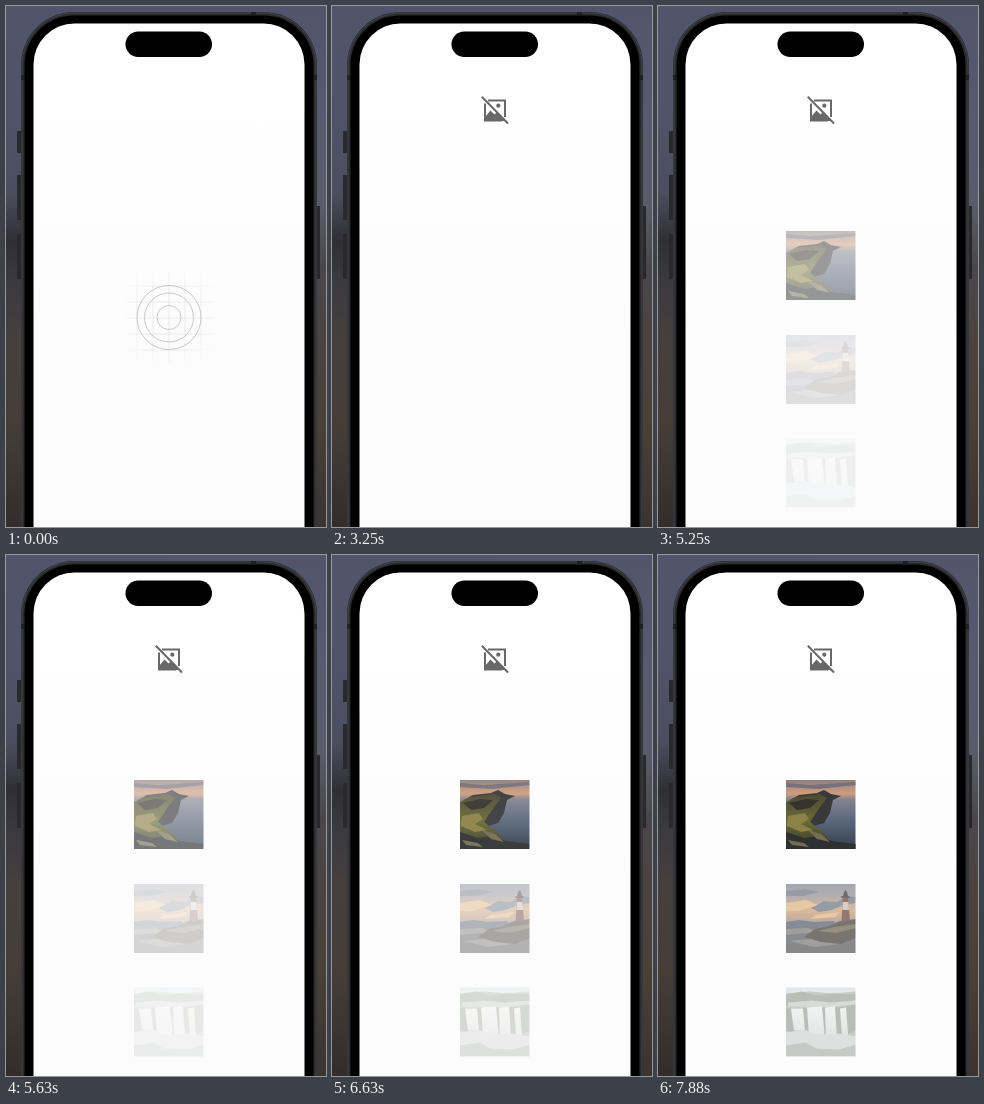
Animation, 320 px wide and 521 px high, one loop 8 s. Source, as an HTML page:

```html
<!DOCTYPE html>
<html lang="en">
<head>
<meta charset="utf-8">
<title>Image fade</title>
<style>
html, body { margin: 0; width: 100%; height: 100%; overflow: hidden; background: #3c3836; }
svg { display: block; width: 100vw; height: 100vh; }
</style>
</head>
<body>
<svg viewBox="0 0 320 521">
  <defs>
    <linearGradient id="wallL" x2="0" y2="1">
      <stop stop-color="#50556b"/><stop offset=".2" stop-color="#50546a"/>
      <stop offset=".36" stop-color="#4b4e5e"/><stop offset=".45" stop-color="#302f36"/>
      <stop offset=".53" stop-color="#3b3a40"/><stop offset=".64" stop-color="#463f3d"/>
      <stop offset=".8" stop-color="#463d37"/><stop offset="1" stop-color="#322d2b"/>
    </linearGradient>
    <linearGradient id="wallR" x2="0" y2="1">
      <stop stop-color="#50556b"/><stop offset=".2" stop-color="#555a70"/>
      <stop offset=".38" stop-color="#5a5c6b"/><stop offset=".5" stop-color="#4a474c"/>
      <stop offset=".62" stop-color="#4b4341"/><stop offset=".8" stop-color="#4a4038"/>
      <stop offset="1" stop-color="#3b3330"/>
    </linearGradient>
    <linearGradient id="paper" x2="0" y2="1">
      <stop stop-color="#fff"/><stop offset=".28" stop-color="#fefefe"/>
      <stop offset=".5" stop-color="#fcfcfd"/><stop offset="1" stop-color="#fcfcfd"/>
    </linearGradient>
    <radialGradient id="line" gradientUnits="userSpaceOnUse" cx="163" cy="311.500" r="49">
      <stop stop-color="#e4e4e4"/><stop offset=".7" stop-color="#e9e9e9"/>
      <stop offset="1" stop-color="#f8f8f8"/>
    </radialGradient>
    <linearGradient id="sky1" x2="0" y2="1">
      <stop stop-color="#8b7f7f"/><stop offset=".1" stop-color="#b3907f"/>
      <stop offset=".2" stop-color="#cf9d7e"/><stop offset=".28" stop-color="#85838f"/>
      <stop offset=".6" stop-color="#58677a"/><stop offset="1" stop-color="#343f4d"/>
    </linearGradient>
    <linearGradient id="grass" x2="0" y2="1">
      <stop stop-color="#4c4934"/><stop offset=".5" stop-color="#696937"/>
      <stop offset="1" stop-color="#36372a"/>
    </linearGradient>
    <linearGradient id="sky2" x2="0" y2="1">
      <stop stop-color="#838b98"/><stop offset=".18" stop-color="#9b9494"/>
      <stop offset=".38" stop-color="#d2a377"/><stop offset=".54" stop-color="#a7917f"/>
      <stop offset=".58" stop-color="#5e6672"/><stop offset="1" stop-color="#62605e"/>
    </linearGradient>
    <linearGradient id="fall" x2="0" y2="1">
      <stop stop-color="#e3e4e2"/><stop offset="1" stop-color="#c4c8c5"/>
    </linearGradient>
    <clipPath id="tile"><path d="M0 0h69.500v69H0z"/></clipPath>
  </defs>

  <!-- backdrop and phone -->
  <path fill="url(#wallL)" d="M0 0h160v521H0z"/>
  <path fill="url(#wallR)" d="M160 0h160v521H160z"/>
  <path fill="#29292b" d="M11 125h5v22h-5zM11 169h5v45h-5zM11 228h5v45h-5zM310 200h4v73h-4z"/>
  <rect x="15" y="6" width="296" height="620" rx="53" fill="#2b2b2e"/>
  <rect x="16" y="7" width="294" height="620" rx="52" fill="none" stroke="#434448"/>
  <path fill="#202022" d="M15 69h4v5h-4zM307 69h4v5h-4zM245 6h5v3h-5z"/>
  <rect x="18.500" y="9.500" width="289" height="620" rx="49.500"/>
  <rect x="27.500" y="17.500" width="271" height="620" rx="41" fill="url(#paper)"/>
  <rect x="119.500" y="25.500" width="86.500" height="25.500" rx="12.750"/>

  <g id="splash" fill="none">
    <path stroke="url(#line)" stroke-width=".8" d="M131 264v93M147 264v93M163 264v93M179 264v93M195 264v93M120 280h88M120 296h88M120 312h88M120 328h88M120 344h88"/>
    <g stroke="#c9c9c9">
      <circle cx="163" cy="311.500" r="32"/>
      <circle cx="163" cy="311.500" r="24.500"/>
      <circle cx="163" cy="311.500" r="12"/>
    </g>
  </g>

  <g id="icon" fill="none" stroke="#686868" stroke-width="2">
    <path d="M156 94.500H173V111M153 97.500V114.500H170"/>
    <circle cx="166.300" cy="99.700" r="2.100" fill="#686868" stroke="none"/>
    <path fill="#686868" stroke="none" d="M153 111l5.500-6.500 4 4 2.500-2.500 8 9H153z"/>
    <path d="M149.800 90.800L176 117.500"/>
  </g>

  <g class="photo" transform="translate(128 225)" clip-path="url(#tile)">
    <path fill="url(#sky1)" d="M0 0h70v69H0z"/>
    <path fill="#777078" d="M0 3l24 2 46-3v3l-38 4-32-2z"/>
    <path fill="#39383a" d="M4 20l9-5 18-2 7-3 7 4 10 2-8 4-3 13-6 10-10 3z"/>
    <path fill="url(#grass)" d="M0 22l10-5 24-3 7 4-7 9-6 9-4 6 13 10 8 9 4 8H0z"/>
    <path fill="#35332c" d="M3 23l17-4 13 1-9 8-13 2z"/>
    <path fill="#8c8247" d="M2 36l17-3 4 6-8 5 12 6-12 2L1 46z"/>
    <path fill="#2e3031" d="M0 52l18 6 14-2 14 5 24 3v5H0z"/>
    <path fill="#746d53" d="M22 50l13 4 9 8-13-3zM2 60l16 3 5 4-17-2z"/>
  </g>

  <g class="photo" transform="translate(128 329)" clip-path="url(#tile)">
    <path fill="url(#sky2)" d="M0 0h70v69H0z"/>
    <path fill="#737b88" d="M25 24l13-7 13 1 9-6 10 1v6l-13 2-11 5-13 2zM0 7l18-2 16 3-17 4H0z"/>
    <path fill="#e1b785" d="M0 19l20-3 12 5-19 6H0zM30 31l24-3-5 5-25 2z"/>
    <path fill="#5b6573" d="M0 38l13-2 15 2 20-1v4H0z"/>
    <path fill="#817f7b" d="M0 45l22-1 12 4-34 3zM4 57l30-3 20 6-26 3z"/>
    <path fill="#4e463e" d="M18 53l11-8 15-3 10-5 16-2v19l-15 6-20-2z"/>
    <path fill="#756756" d="M31 47l17-4 22-3v4l-20 5z"/>
    <path fill="#71493b" d="M57 13h5l2 24h-8.500z"/>
    <path fill="#c9beb2" d="M56.700 18h5.700l.7 8h-6.800z"/>
    <path fill="#453b39" d="M57 12l1-4 1.500-2 1.500 2 1 4zM55.500 12h8v2h-8z"/>
  </g>

  <g class="photo" transform="translate(128 432.500)" clip-path="url(#tile)">
    <path fill="#849084" d="M0 0h70v69H0z"/>
    <path fill="#c6cfd2" d="M0 0h70v4l-24 2-22-2L0 6z"/>
    <path fill="#65735f" d="M0 7l16-3 14 4 16-2 24 1v13l-22-3-22 2-26-1z"/>
    <path fill="#aab1a8" d="M2 15l24-2 18 2 26-2v4l-28 3-40-1z"/>
    <path fill="#67705f" d="M0 21l70-2v24l-13 6H20L0 43z"/>
    <path fill="url(#fall)" d="M5 21h12l2 22H8zM21 20l15-1 3 32-16-2zM39 20l10-1 2 32H40zM54 21l6-1 2 27-6 2z"/>
    <path fill="#b8beba" d="M0 45l18-3 14 5 20-1 18 3v20H0z"/>
    <path fill="#828c82" d="M0 58l20-3 10 6 24 1 16-5v12H0z"/>
  </g>
</svg>
<script>
const LOOP = 8000, SPLASH_OUT = [2100, 2500], SHOW = 3250;
const FADES = [4000, 7000, 10000];
const splash = document.getElementById('splash');
const icon = document.getElementById('icon');
const photos = document.querySelectorAll('.photo');

const part = (t, a, b) => Math.min(1, Math.max(0, (t - a) / (b - a)));
const ease = p => (1 - Math.cos(Math.PI * p)) / 2;

function draw(now) {
  const t = now % LOOP;
  splash.style.opacity = 1 - part(t, ...SPLASH_OUT);
  icon.style.opacity = t < SHOW ? 0 : 1;
  photos.forEach((photo, i) => {
    photo.style.opacity = ease(part(t, SHOW, SHOW + FADES[i]));
  });
}

const start = performance.now();
function tick() {
  draw(performance.now() - start);
  requestAnimationFrame(tick);
}
tick();
</script>
</body>
</html>
```
